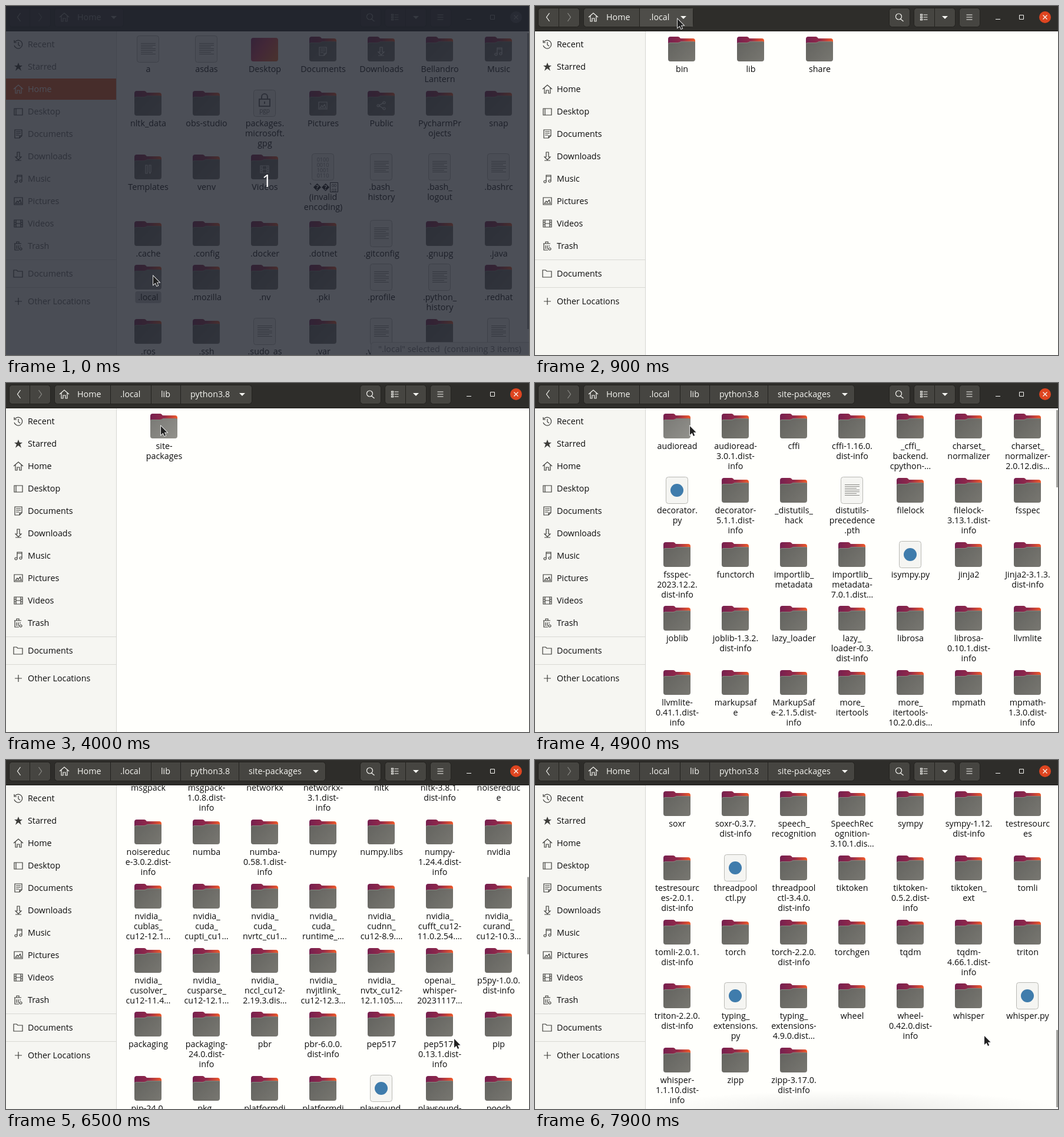
These frames come from a looping animation (888x592 px, 8000 ms). An HTML page with a canvas:

```html
<!DOCTYPE html>
<html lang="en">
<head>
<meta charset="utf-8">
<title>File manager</title>
<style>
html, body { margin: 0; height: 100%; overflow: hidden; background: #fffffc; }
canvas { display: block; }
</style>
</head>
<body>
<canvas id="stage" width="888" height="592"></canvas>
<script>
const c = document.getElementById('stage').getContext('2d');
const LOOP = 8000, NOTCH = 67.1, MAX_SCROLL = 1631, PITCH = 108.8;
const font = (size = 14.3) => `500 ${size}px "Open Sans", "Noto Sans", sans-serif`;

// Line icons on a 16 px grid around the origin
const dot = (x, y) => `M${x - 2} ${y}a2 2 0 1 0 4 0a2 2 0 1 0-4 0`;
const ICONS = {
  Recent: 'M-6-4A7 7 0 1 1-7 2M-7-7V-3H-3M0-4V1L3 3',
  Starred: 'M0-7 2-2H7L3 1 5 7 0 3-5 7-3 1-7-2H-2Z',
  Home: 'M-8 0 0-7 8 0M-5-2V7H-2V2H2V7H5V-2',
  Desktop: 'M-7-5H7V6H-7ZM-4-5V6',
  Documents: 'M-6-7H6V3L2 7H-6ZM-4-4H4M-4-1H4M-4 2H1M2 7V3H6',
  Downloads: 'M-2-7V1H-5L0 6 5 1H2V-7ZM-5 7H5',
  Music: 'M-2 5V-6H6V4M-2-4H6' + dot(-4, 5) + dot(4, 4),
  Pictures: 'M-7-6H7V6H-7ZM-5 4-2 0 0 2 3-2 5 4Z',
  Videos: 'M-7-6H7V6H-7ZM-4-6V6M4-6V6M-4 0H4M-7-2H-4M-7 2H-4M4-2H7M4 2H7',
  Trash: 'M-7-4H5M-3-4V-7H1V-4M-6-4V7H1M-3-1V5M0-1V5M3-1V1' + dot(4, 5),
  Folder: 'M-8 5V-6H-3L-1-4H7V6H-8Z',
  Plus: 'M-6 0H6M0-6V6',
  Public: 'M4-5-4 0 4 5' + dot(5, -5) + dot(-5, 0) + dot(5, 5),
  Templates: 'M-4-7V7H-1V-7ZM2-7H5V4L3.5 7 2 4Z',
  Search: 'M-6-1a5 5 0 1 0 10 0a5 5 0 1 0-10 0M2 3 7 7',
  List: 'M-6-5h3v2h-3ZM-6-1h3v2h-3ZM-6 3h3v2h-3ZM-1-4H6M-1 0H6M-1 4H6',
  Menu: 'M-5-4H5M-5 0H5M-5 4H5',
  Back: 'M2-7-3 0 2 7',
  Forward: 'M-2-7 3 0-2 7'
};
const FOLDER_BACK = new Path2D('M0 10V4Q0 0 4 0H17Q19 0 21 3H42Q46 3 46 7V20H0Z');
const FOLDER_FRONT = new Path2D('M0 12Q0 10 2 10H17Q19 10 22 8H44Q46 8 46 10V38Q46 42 42 42H4Q0 42 0 38Z');
const ARROW = new Path2D('M0 0V15L3.6 11.8 6 17 8.2 16 5.9 10.8H10.6Z');

const SIDEBAR = ['Recent', 'Starred', 'Home', 'Desktop', 'Documents', 'Downloads',
  'Music', 'Pictures', 'Videos', 'Trash', 'Documents', 'Other Locations'];
const CRUMBS = ['Home', '.local', 'lib', 'python3.8', 'site-packages'];
const CRUMB_X = [83, 178, 247, 297, 396, 521];

// Items are split by commas, label lines by spaces; * marks a text file
const parse = text => text.trim().split('\n').map(row => row.trim().split(','));
const HOME = parse(`
*a,*asdas,Desktop,Documents,Downloads,Bellandro Lantern,Music
nltk_data,obs-studio,*packages. microsoft. gpg,Pictures,Public,PycharmPr ojects,snap
Templates,venv,Videos,*\`\ufffd\ufffd\u2003 (invalid encoding),*.bash_ history,*.bash_ logout,*.bashrc
.cache,.config,.docker,.dotnet,*.gitconfig,.gnupg,.java
.local,.mozilla,.nv,.pki,*.profile,*.python_ history,.redhat
.ros,.ssh,*.sudo_as _admin,.var,*.viminfo,.vscode,*.wget-hsts`);
const PACKAGES = parse(`
audioread,audioread- 3.0.1.dist- info,cffi,cffi-1.16.0. dist-info,_cffi_ backend. cpython-…,charset_ normalizer,charset_ normalizer- 2.0.12.dis…
decorator. py,decorator- 5.1.1.dist- info,_distutils_ hack,*distutils- precedence .pth,filelock,filelock- 3.13.1.dist- info,fsspec
fsspec- 2023.12.2. dist-info,functorch,importlib_ metadata,importlib_ metadata- 7.0.1.dist…,isympy.py,jinja2,Jinja2-3.1.3. dist-info
joblib,joblib-1.3.2. dist-info,lazy_loader,lazy_ loader-0.3. dist-info,librosa,librosa- 0.10.1.dist- info,llvmlite
llvmlite- 0.41.1.dist- info,markupsaf e,MarkupSaf e-2.1.5.dist- info,more_ itertools,more_ itertools- 10.2.0.dis…,mpmath,mpmath- 1.3.0.dist- info
msgpack,msgpack- 1.0.8.dist- info,networkx,networkx- 3.1.dist- info,nltk,nltk-3.8.1. dist-info,noisereduc e
noisereduc e-3.0.2.dist- info,numba,numba- 0.58.1.dist- info,numpy,numpy.libs,numpy- 1.24.4.dist- info,nvidia
nvidia_ cublas_ cu12-12.1…,nvidia_ cuda_ cupti_cu1…,nvidia_ cuda_ nvrtc_cu1…,nvidia_ cuda_ runtime_…,nvidia_ cudnn_ cu12-8.9.…,nvidia_ cufft_cu12- 11.0.2.54.…,nvidia_ curand_ cu12-10.3…
nvidia_ cusolver_ cu12-11.4…,nvidia_ cusparse_ cu12-12.1…,nvidia_ nccl_cu12- 2.19.3.dis…,nvidia_ nvjitlink_ cu12-12.3…,nvidia_ nvtx_cu12- 12.1.105.…,openai_ whisper- 20231117…,p5py-1.0.0. dist-info
packaging,packaging- 24.0.dist- info,pbr,pbr-6.0.0. dist-info,pep517,pep517- 0.13.1.dist- info,pip
pip-24.0. dist-info,pkg_ resources,platformdi rs,platformdi rs-4.2.0.dist- info,playsound. py,playsound- 1.3.0.dist- info,pooch
pooch- 1.8.1.dist- info,pyaudio,PyAudio- 0.2.14.dist- info,__pycache_ _,pycparser,pycparser- 2.21.dist- info,queuelib
queuelib- 1.6.2.dist- info,regex,regex- 2023.12.25. dist-info,requests,requests- 2.28.0.dist- info,sample,scikit_ learn.libs
scikit_ learn-1.3.2. dist-info,scipy,scipy.libs,scipy- 1.10.1.dist- info,setuptools,setuptools- 69.0.3.dist- info,sklearn
_ sounddevic e.py,sounddevic e.py,sounddevic e-0.4.6.dist- info,_soundfile. py,soundfile. py,soundfile- 0.12.1.dist- info,_soundfile_ data
soxr,soxr-0.3.7. dist-info,speech_ recognition,SpeechRec ognition- 3.10.1.dis…,sympy,sympy-1.12. dist-info,testresourc es
testresourc es-2.0.1. dist-info,threadpool ctl.py,threadpool ctl-3.4.0. dist-info,tiktoken,tiktoken- 0.5.2.dist- info,tiktoken_ ext,tomli
tomli-2.0.1. dist-info,torch,torch-2.2.0. dist-info,torchgen,tqdm,tqdm- 4.66.1.dist- info,triton
triton-2.2.0. dist-info,typing_ extensions. py,typing_ extensions- 4.9.0.dist…,wheel,wheel- 0.42.0.dist- info,whisper,whisper.py
whisper- 1.1.10.dist- info,zipp,zipp-3.17.0. dist-info`);
const isPython = name => /\. ?py$/.test(name);

// Each folder: when it opens, its rows, first column centre, column step, row tops
const VIEWS = [
  { from: 0, rows: HOME, x: 241, step: 99.09, tops: [52, 144, 252, 365, 439, 531] },
  { from: 500, rows: [['bin', 'lib', 'share']], x: 249, step: 117 },
  { from: 2200, rows: [['python3.8']], x: 256, step: 0 },
  { from: 3600, rows: [['site- packages']], x: 268, step: 0 },
  { from: 4900, rows: PACKAGES, x: 241, step: 99.09 }
];
// start, end, item, start of the status note, its number of items
const SELECTIONS = [
  [0, 500, '.local', 0, '3 items'], [1800, 2200, 'lib', 2000, '1 item'],
  [3400, 3600, 'python3.8', 3500, '1 item'], [4300, 4900, 'site- packages', 4700, '137 items']
];
const POINTER = [[0, 250, 458], [400, 250, 458], [700, 262, 235], [800, 262, 235], [900, 242, 22],
  [1000, 252, 40], [1400, 345, 95], [1700, 364, 75], [2300, 364, 75], [2600, 301, 88],
  [2900, 272, 85], [3400, 272, 85], [3800, 273, 90], [3900, 273, 90], [4000, 263, 73],
  [4900, 263, 73], [5100, 420, 190], [5200, 420, 190], [5500, 560, 291], [5800, 560, 291],
  [5900, 556, 340], [6000, 650, 450], [6100, 746, 526], [6200, 746, 526], [6400, 761, 473],
  [6800, 761, 473], [6900, 763, 468], [8000, 763, 468]];
// time, wheel notches reached
const WHEEL = [[5600, 1], [5700, 4], [6300, 5], [6400, 7], [6500, 9], [6600, 11], [6700, 12],
  [6900, 13], [7000, 15], [7100, 17], [7200, 18], [7500, 20], [7600, 22], [7700, 24], [7800, 25]];

function pointerAt(t) {
  const i = Math.max(1, POINTER.findIndex(k => k[0] >= t));
  const [a, x0, y0] = POINTER[i - 1], [b, x1, y1] = POINTER[i], p = (t - a) / (b - a);
  return [Math.round(x0 + (x1 - x0) * p), Math.round(y0 + (y1 - y0) * p)];
}
function scrollAt(t) {
  const n = WHEEL.filter(k => k[0] <= t).pop()?.[1] ?? 0;
  return Math.min(MAX_SCROLL, n * NOTCH);
}

function rect(x, y, w, h, fill) { c.fillStyle = fill; c.fillRect(x, y, w, h); }
function round(x, y, w, h, r, fill, line) {
  c.beginPath();
  c.roundRect(x, y, w, h, r);
  if (fill) { c.fillStyle = fill; c.fill(); }
  if (line) { c.strokeStyle = line; c.lineWidth = 1; c.stroke(); }
}
function circle(x, y, r, fill) { c.beginPath(); c.arc(x, y, r, 0, 7); c.fillStyle = fill; c.fill(); }
function text(s, x, y, fill, align = 'left', size) {
  c.font = font(size);
  c.textAlign = align;
  c.fillStyle = fill;
  c.fillText(s, x, y);
}
function widthOf(s) { c.font = font(); return c.measureText(s).width; }
function icon(name, x, y, color, filled) {
  const path = new Path2D(ICONS[name]);
  c.save();
  c.translate(x, y);
  c.lineWidth = 1.2;
  c.strokeStyle = c.fillStyle = color;
  filled ? c.fill(path) : c.stroke(path);
  c.restore();
}
function caret(x, y, color) {
  c.fillStyle = color;
  c.fill(new Path2D(`M${x - 5} ${y - 2}h10l-5 5Z`));
}
function gradient(x1, y1, ...colors) {
  const g = c.createLinearGradient(0, 0, x1, y1);
  colors.forEach((color, i) => g.addColorStop(i / (colors.length - 1), color));
  return g;
}

function folder(name, x, y, hover) {
  c.save();
  c.translate(x - 23, y);
  if (name === 'Desktop') {
    round(0, 2, 46, 40, 4, gradient(46, 30, '#8c2464', '#d33b5c', '#ee6a34'));
  } else {
    c.fillStyle = gradient(46, 0, '#76204f', '#92294a', '#ef5a2a');
    c.fill(FOLDER_BACK);
    c.fillStyle = hover ? gradient(46, 42, '#777773', '#92918c') : gradient(46, 42, '#61615d', '#787771');
    c.fill(FOLDER_FRONT);
    c.strokeStyle = '#85847e';
    c.lineWidth = 1;
    c.stroke(new Path2D('M1 12.5Q1 10.5 3 10.5H17Q19 10.5 22 8.5H45'));
    if (ICONS[name]) icon(name, 23, 25, '#dededa');
  }
  c.restore();
}
function file(name, x, y) {
  round(x - 18.5, y - 1.5, 37, 45, 4, '#f5f5f2', '#b9b9b4');
  if (isPython(name)) return circle(x, y + 21, 11, '#3f7cac');
  if (name.includes('gpg')) {
    c.lineWidth = 2;
    c.strokeStyle = '#666';
    c.stroke(new Path2D(`M${x - 9} ${y + 14}h18v12h-18ZM${x - 5} ${y + 14}v-4a5 5 0 0 1 10 0v4M${x} ${y + 18}v4`));
    return text('pgp', x, y + 37, '#666', 'center', 10);
  }
  if (name.includes('invalid')) {
    return ['0100', '0010', '1001', '0110'].forEach((s, i) =>
      text(s, x, y + 12 + i * 9, '#888', 'center', 9));
  }
  for (let i = 0; i < 7; i++) rect(x - 12, y + 11 + i * 3, i % 3 === 2 ? 20 : 25, 1, '#8b8b87');
}
function item(raw, x, y, state) {
  const name = raw.replace('*', ''), lines = name.split(' '), [px, py] = state.pointer;
  const hover = Math.abs(px - x) < 23 && py >= y && py < y + 42;
  if (raw[0] === '*' || isPython(name)) file(name, x, y);
  else folder(name, x, y, hover);
  const chosen = state.selected === name;
  if (chosen) {
    const w = Math.max(...lines.map(widthOf)) + 10;
    round(x + .5 - w / 2, y + 45, w, 17 * lines.length + 3, 4, state.dim ? '#c6c6c2' : '#e95420');
  }
  lines.forEach((s, i) => text(s, x + .5, y + 60 + 17 * i, chosen && !state.dim ? '#fff' : '#0c0c0c', 'center'));
  if (name.includes('invalid')) {
    round(x + 12.5, y + 47.5, 13, 16, 0, null, '#222');
    text('00', x + 19, y + 55, '#222', 'center', 7);
    text('03', x + 19, y + 63, '#222', 'center', 7);
  }
}

function content(t, state) {
  const { rows, x, step, tops } = VIEWS[state.view], scroll = scrollAt(t);
  c.save();
  c.beginPath();
  c.rect(188, 43, 700, 549);
  c.clip();
  rows.forEach((row, r) => {
    const y = tops ? tops[r] : Math.round(52 + r * PITCH - scroll);
    if (y > -110 && y < 600) row.forEach((name, i) => item(name, Math.round(x + i * step), y, state));
  });
  if (state.view === 0) rect(885, 46, 3, 502, '#a2a29e');
  if (state.view === 4) rect(885, 46 + scroll * .2526, 3, 131, '#a2a29e');
  if (t >= 7900) {
    // Soft overscroll glow at the end of the list
    c.translate(538, 592);
    c.scale(1, .09);
    const glow = c.createRadialGradient(0, 0, 0, 0, 0, 350);
    glow.addColorStop(0, 'rgba(0,0,0,.08)');
    glow.addColorStop(1, 'rgba(0,0,0,0)');
    circle(0, 0, 350, glow);
  }
  if (state.note) {
    const w = widthOf(state.note) + 26;
    round(888.5 - w, 570.5, w, 30, [5, 0, 0, 0], '#f6f6f2', '#cfcfca');
    text(state.note, 875, 587, state.dim ? '#777' : '#222', 'right');
  }
  c.restore();
}

function sidebar(state) {
  rect(0, 43, 187, 549, '#f6f6f2');
  rect(187, 43, 1, 549, '#d7d7d2');
  rect(0, 430, 187, 1, '#d9d9d4');
  rect(0, 477, 187, 1, '#d9d9d4');
  SIDEBAR.forEach((name, i) => {
    const y = i < 10 ? 65 + 38 * i : 454 + 47 * (i - 10), active = name === 'Home' && state.view === 0;
    if (active) rect(0, y - 18, 187, 36, '#e95420');
    const ink = active ? '#fff' : state.dim ? '#626260' : '#0c0c0c';
    icon(i === 10 ? 'Folder' : i === 11 ? 'Plus' : name, 21, y, active ? '#fff' : '#3c3c39', i === 1);
    text(name, 37, y + 5, ink);
  });
}

function header(state) {
  const ink = state.dim ? '#91918d' : '#f6f6f2', faint = state.dim ? '#666662' : '#8b8b86';
  const fill = state.dim ? '#353431' : '#464541', line = '#23221f';
  const button = (x, w, name, r = 5, color = ink) => {
    round(x + .5, 3.5, w, 32, r, fill, line);
    if (name) icon(name, x + w / 2, 19, color);
  };
  rect(0, 0, 888, 42, '#2e2d2a');
  rect(0, 42, 888, 1, '#1b1a18');
  button(5, 35, 'Back', [5, 0, 0, 5]);
  button(40, 35, 'Forward', [0, 5, 5, 0], faint);

  const last = state.view, end = CRUMB_X[last + 1] + 21;
  button(82, end - 82);
  const [px, py] = state.pointer;
  CRUMBS.slice(0, last + 1).forEach((name, i) => {
    const x = CRUMB_X[i], right = i === last ? end : CRUMB_X[i + 1] - 1;
    if (py < 35 && px >= x && px < right) rect(x, 4, right - x, 31, '#4e4d49');
    if (i) rect(x - 1, 4, 1, 31, line);
    else icon('Home', 99, 19, ink);
    text(name, i ? x + 16 : 121, 24, ink);
  });
  caret(end - 16, 19, ink);

  button(601, 35, 'Search');
  button(643, 35, 'List', [5, 0, 0, 5]);
  button(678, 35, null, [0, 5, 5, 0]);
  caret(696, 19, ink);
  button(720, 35, 'Menu');
  rect(782, 22, 8, 1, ink);
  round(822.5, 15.5, 7, 7, 0, null, ink);
  circle(866, 19, 10, state.dim ? '#4d4c49' : '#de4520');
  c.strokeStyle = ink;
  c.lineWidth = 1.3;
  c.stroke(new Path2D('M862.5 15.5l7 7M869.5 15.5l-7 7'));
}

function draw(now) {
  const t = Math.floor(now % LOOP / 100) * 100;
  const choice = SELECTIONS.find(s => t >= s[0] && t < s[1]);
  const state = {
    view: VIEWS.findLastIndex(v => v.from <= t),
    pointer: pointerAt(t),
    dim: t < 200,
    selected: choice?.[2],
    note: choice && t >= choice[3] &&
      `"${choice[2].replace(' ', '')}" selected  (containing ${choice[4]})`
  };
  rect(0, 0, 888, 592, '#fffffc');
  content(t, state);
  sidebar(state);
  header(state);
  if (state.dim) {
    rect(0, 0, 888, 592, 'rgba(32,36,47,.8)');
    text('1', 443, 307, '#fff', 'center', 29);
  }
  c.save();
  c.translate(...state.pointer);
  c.lineWidth = 1.6;
  c.strokeStyle = '#fff';
  c.stroke(ARROW);
  c.fillStyle = '#222';
  c.fill(ARROW);
  c.restore();
  requestAnimationFrame(draw);
}
requestAnimationFrame(draw);
</script>
</body>
</html>
```
